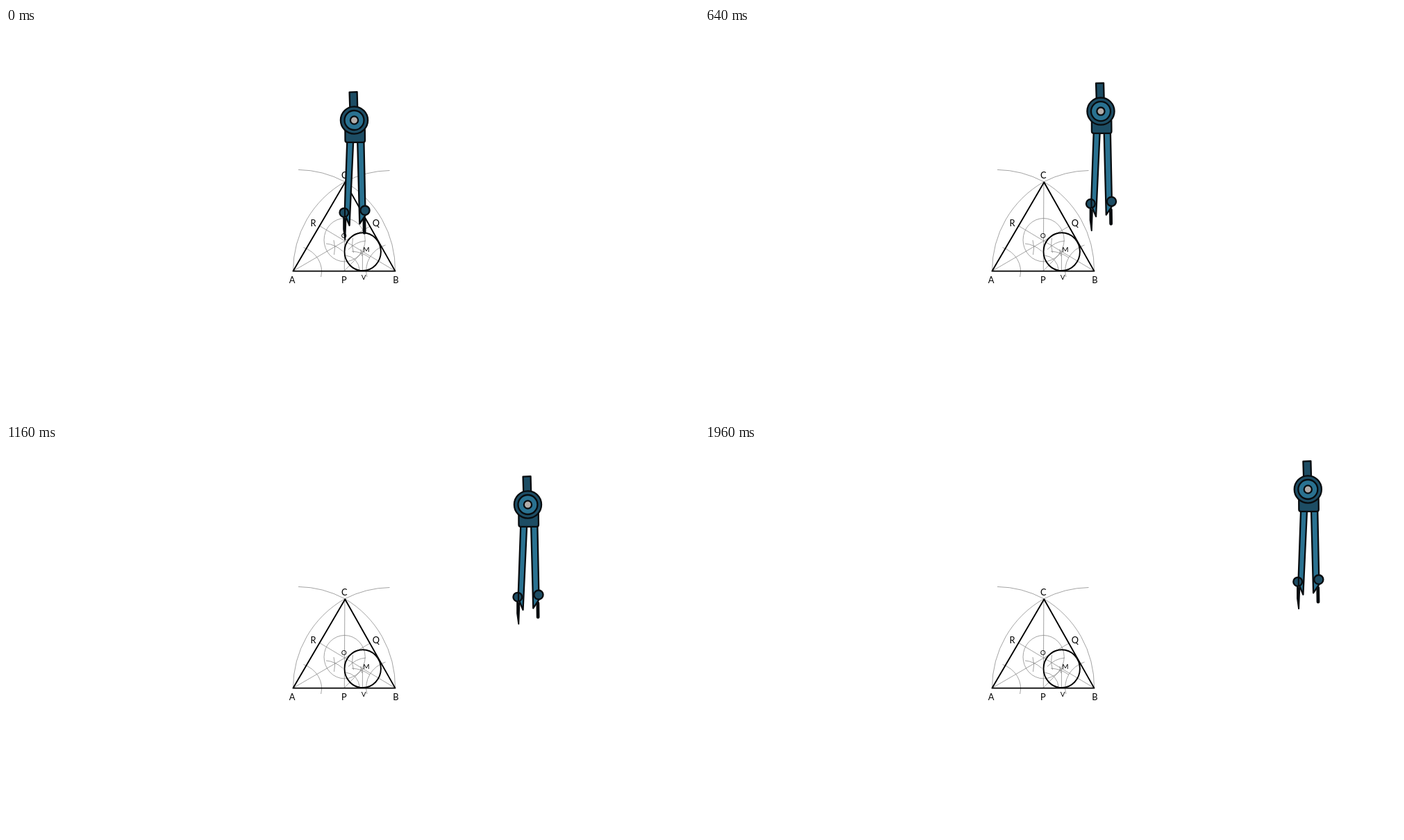
An HTML page for the animation above (2 s loop, 998x561 px).

```html
<!DOCTYPE html>
<html lang="en">
<head>
<meta charset="utf-8">
<title>Compass construction</title>
<style>
  html, body { margin: 0; width: 100%; height: 100%; overflow: hidden; background: #fff; }
  svg { display: block; width: 998px; height: 561px; }
  text { font-family: Lato, "Open Sans", sans-serif; font-size: 12.8px; text-anchor: middle; fill: #000; }
  .small { font-size: 10px; }
  .thin { fill: none; stroke: #7c7c7c; stroke-width: .7; }
  .bold { fill: none; stroke: #000; stroke-width: 1.9; stroke-linejoin: round; }
  #compass { stroke: #080c0f; stroke-width: 2.3; stroke-linejoin: round; stroke-linecap: round; }
  .dark { fill: #1d4d64; }
  .light { fill: #2a7291; }
</style>
</head>
<body>
<svg viewBox="0 0 998 561">
  <g class="thin">
    <!-- large arcs about A and B -->
    <path d="M421 204.4A147 147 0 0 1 488 221.8A147 147 0 0 1 560.5 350.5"/>
    <path d="M552.5 205.5A147 147 0 0 0 488 221.8A147 147 0 0 0 413.5 350.5"/>
    <!-- bisectors -->
    <path d="M487.9 222L487.3 350.5M413.5 350.5L524 286M560.5 350.5L451 285"/>
    <ellipse cx="487.6" cy="305.7" rx="29.6" ry="31.2"/>
    <!-- angle arcs -->
    <path d="M428.5 316.5A41 37 0 0 1 453.6 359M546.5 313A41 39 0 0 0 519.8 359"/>
    <path d="M461 311Q474 312 485 322M472 306Q475 316 472.5 327"/>
    <path d="M493 319.5Q504 308 518 307M499.5 303Q497 313 500.5 324"/>
    <!-- construction of M -->
    <path d="M487 327.5Q508 330 509.5 351M487 350.5L515 321.5M513.4 350V323"/>
    <path d="M498 322Q513 323 524 331.5M511 319Q510 324 513 329"/>
  </g>
  <g class="bold">
    <path d="M413.5 350.6H560.5L488.3 222.5Z"/>
    <ellipse cx="513.7" cy="322.6" rx="26.2" ry="27.4"/>
  </g>
  <g id="labels"></g>
  <g id="compass">
    <path d="M486.2 273L486.2 290L488.3 305L489.4 276Z" fill="#080c0f" stroke-width="2"/>
    <path d="M515.9 275L516.2 295.2" stroke-width="4.8"/>
    <path class="light" d="M491.3 163L487.6 268L494.6 284.8L500.2 163Z"/>
    <circle class="dark" cx="486.9" cy="266.2" r="6.4"/>
    <path d="M488 260V272" stroke-width="2"/>
    <path class="light" d="M506.2 163H515.4L517.6 270L509.3 282.3Z"/>
    <circle class="dark" cx="517" cy="263.1" r="6.6"/>
    <path class="dark" d="M488.4 146H516.8L517 162Q517 164.8 514 164.8H491.5Q488.5 164.8 488.5 162Z"/>
    <path class="dark" d="M494.6 92.6L505.6 92.2L506.2 115H495.3Z"/>
    <circle class="dark" cx="501.5" cy="133" r="19.6"/>
    <circle class="light" cx="501.5" cy="133" r="14"/>
    <circle cx="501.5" cy="133" r="5.6" fill="#b2adaa"/>
  </g>
</svg>
<script>
  const LOOP = 2000, STEP = 40, TRAVEL = 1955;
  const SHIFT = { x: 366.8, y: -69 };
  const compass = document.getElementById("compass");

  const labels = [
    ["A", 412, 367.8], ["B", 561.3, 367.8], ["C", 487.4, 216.5],
    ["P", 486.8, 367.8], ["Q", 532.8, 285.6], ["R", 442.5, 285.6],
    ["O", 486.8, 302.7, "small"], ["M", 518.8, 323.2, "small"], ["V", 515.2, 362.8, "small"]
  ];
  document.getElementById("labels").innerHTML = labels
    .map(([s, x, y, cls = ""]) => `<text x="${x}" y="${y}" class="${cls}">${s}</text>`)
    .join("");

  // Position whose speed follows a raised cosine.
  const ease = u => u - Math.sin(2 * Math.PI * u) / (2 * Math.PI);

  function draw(ms) {
    const time = Math.floor((ms % LOOP) / STEP) * STEP;
    const p = ease(Math.min(time / TRAVEL, 1));
    compass.setAttribute("transform", `translate(${SHIFT.x * p} ${SHIFT.y * p})`);
  }

  const start = performance.now();
  function tick() {
    draw(performance.now() - start);
    requestAnimationFrame(tick);
  }
  tick();
</script>
</body>
</html>
```
